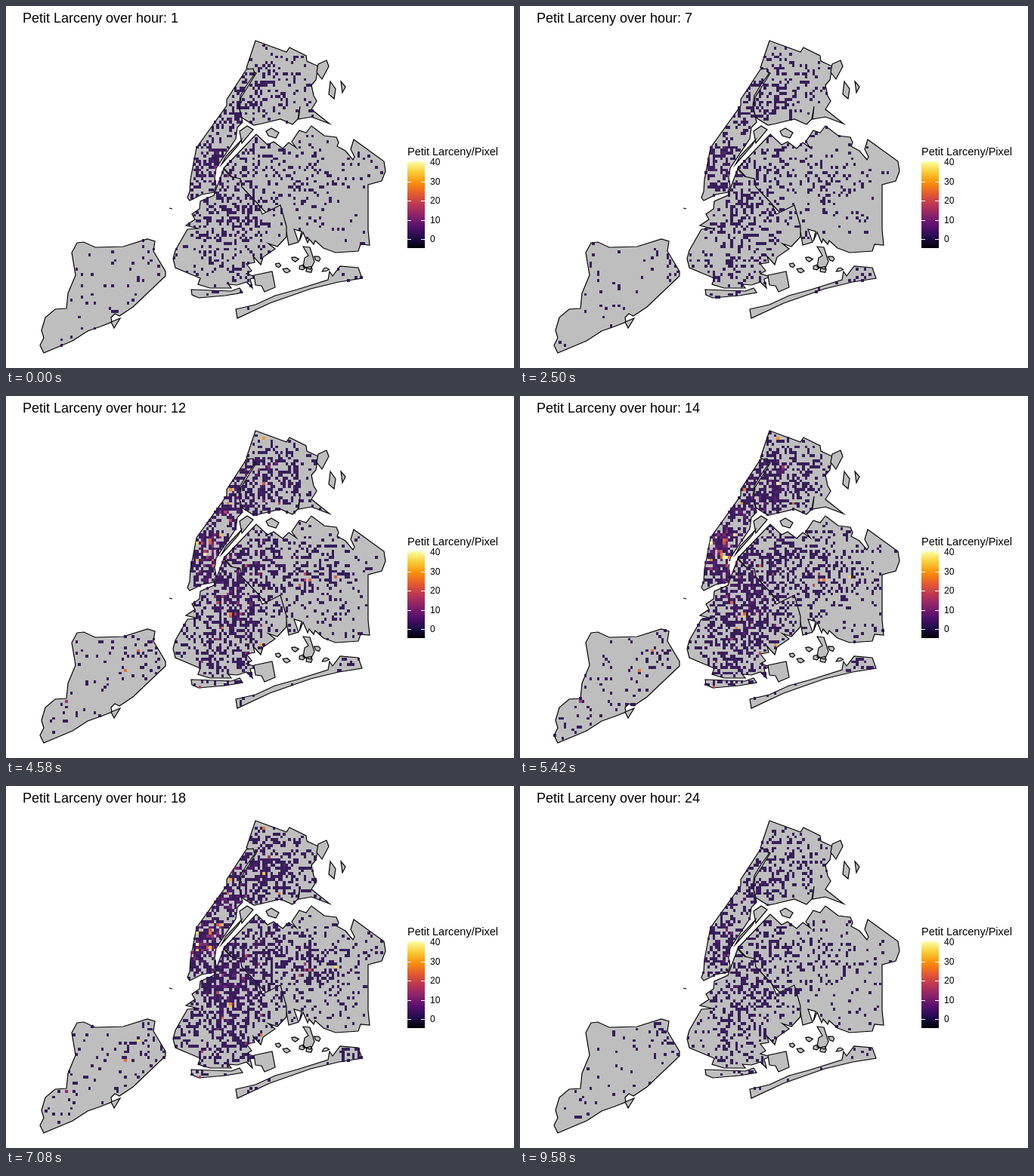
These frames come from a looping animation (672x480 px, 10 s). An HTML page with a canvas:

```html
<!DOCTYPE html>
<html lang="en">
<head>
<meta charset="utf-8">
<style>
  html, body { margin: 0; width: 100%; height: 100%; overflow: hidden; background: #fff; }
  canvas { display: block; }
</style>
</head>
<body>
<canvas id="map" width="672" height="480"></canvas>
<script>
const ctx = document.getElementById('map').getContext('2d');
const LOOP = 10000, HOURS = 24;
const CELL_W = 3.39, CELL_H = 3.75, LEFT = 44.4, TOP = 43;

// Coastlines; the fourth region overlaps the third to form their shared border
const coasts = {
  north: 'M330 46 371 61 375 55 397 66 398 73 413 80 410 98 404 105 407 119 411 126 404 137 428 156 404 147 387 150 389 133 386 150 379 157 363 150 338 156 328 158 312 148 309 137 311 121 321 105 331 89 318 82Z',
  midtown: 'M327 83 318 84 292 124 292 132 252 188 244 230 243 246 240 254 243 258 259 250 275 247 278 238 276 228 278 215 304 176 306 161 313 154 308 133 310 119 319 104 329 90Z',
  east: 'M288 215 331 170 346 184 354 180 366 189 374 181 384 188 378 180 388 165 397 168 404 159 421 172 437 174 440 181 438 186 449 192 459 204 461 200 456 190 460 177 500 206 502 219 497 232 479 237 479 297 481 317 469 316 466 325 436 327 420 321 409 311 407 316 401 309 399 314 393 300 388 312 391 299 381 296 387 313 374 317 371 300 340 270Z',
  south: 'M288 216 279 240 275 251 257 259 256 269 246 276 250 283 238 291 254 295 240 296 224 324 221 335 224 347 257 361 254 369 270 374 298 374 294 369 306 370 318 366 326 374 323 362 331 359 318 355 325 351 318 342 329 340 327 332 337 343 340 333 356 322 347 315 359 319 371 306 371 292 363 264 339 276 333 262 312 240 310 229 297 226Z',
  beach: 'M245 376 298 378 309 374 313 380 290 384 255 387 246 383Z',
  spit: 'M304 402 330 396 356 384 385 376 426 363 428 352 432 358 442 345 466 347 471 361 440 366 403 375 349 394 306 414Z',
  southwest: 'M94 314 103 313 118 320 155 319 187 309 197 312 195 325 211 352 211 358 168 399 150 411 144 408 139 413 140 419 125 425 108 431 88 444 50 460 45 450 50 440 47 430 52 413 65 402 80 401 82 381 92 357 87 327Z'
};
const regions = Object.values(coasts).map(d => new Path2D(d));

const islets = new Path2D(`M413 77 424 72 427 80 418 97 411 88Z M429 100 436 110 434 123 427 117Z M443 100 449 107 445 115Z
  M309 166 319 159 327 164 312 182Z M311 178 307 185 285 210 291 199Z M344 166 351 162 361 168 357 175 347 172Z
  M216 268 220 269Z M328 357 352 352 356 373 342 379 338 371 330 370Z
  M393 319 402 320 408 339 403 349 393 346 395 334 400 331Z M139 419 143 427 151 414Z`);

// Activity centres: x, y, radius, weight
const centres = [
  [325, 118, 40, 1], [375, 100, 35, .3], [266, 207, 32, 1.6], [292, 158, 25, .9],
  [345, 208, 32, .6], [300, 270, 45, 1.05], [285, 345, 45, .5], [410, 235, 40, .45],
  [455, 355, 15, .5], [190, 335, 25, .2], [287, 171, 9, -1.4]
];

const inferno = ['000004', '210c4a', '57106e', '8a226a', 'bc3754', 'e45a31', 'f98e09', 'f9cb35', 'fcffa4'];
const palette = inferno.map(hex => [0, 2, 4].map(i => parseInt(hex.slice(i, i + 2), 16)));

function color(count) {
  const pos = Math.min((count + 4.5) / 45, .999) * (palette.length - 1), i = Math.floor(pos);
  return `rgb(${palette[i].map((c, k) => Math.round(c + (palette[i + 1][k] - c) * (pos - i)))})`;
}

function rand(i, j, k) {
  const s = Math.sin(i * 12.9898 + j * 78.233 + k * 37.719) * 43758.5453;
  return s - Math.floor(s);
}

// Marsh islands in the bay: small irregular polygons around a loose row
for (let n = 0; n < 7; n++) {
  const x = 360 + n * 10.5, y = 344 + 9 * Math.sin(n * 2.2);
  for (let k = 0; k < 5; k++) {
    const a = k * Math.PI * .4, r = 2.5 + 4 * rand(n, k, 3);
    islets[k ? 'lineTo' : 'moveTo'](x + r * Math.cos(a), y + r * .8 * Math.sin(a));
  }
  islets.closePath();
}

const cells = [];
for (let i = 0; i < 136; i++) {
  for (let j = 0; j < 110; j++) {
    const x = LEFT + (i + .5) * CELL_W, y = TOP + (j + .5) * CELL_H;
    if (!regions.some(r => ctx.isPointInPath(r, x, y))) continue;
    const density = centres.reduce((sum, [cx, cy, r, w]) =>
      sum + w * Math.exp(-((x - cx) ** 2 + (y - cy) ** 2) / r ** 2), .065);
    const rate = Math.max(density, .02) * (.3 + 1.4 * rand(i, j, 0));
    cells.push({ i, j, rate, shops: rand(i, j, 90) < .02 * density });
  }
}

function countAt({ i, j, rate, shops }, hour) {
  const activity = .75 + .4 * Math.cos((hour - 16) / HOURS * 2 * Math.PI);
  const trade = Math.sqrt(Math.max(0, Math.sin(Math.PI * (hour - 7) / 16)));
  const u = rand(i, j, hour), v = rand(i, j, hour + 50);
  if (shops && trade) return (14 + 22 * rand(i, j, 91)) * trade * (.7 + .5 * v);
  if (u > 1 - Math.exp(-rate * activity)) return 0;
  return 2 + Math.floor(-Math.log(v + 1e-6) * rate * rate * (.4 + .9 * trade));
}

function text(str, x, y, size) {
  ctx.fillStyle = '#000';
  ctx.font = `${size}px "Liberation Sans", Arial, sans-serif`;
  ctx.fillText(str, x, y);
}

function drawLegend() {
  text('Petit Larceny/Pixel', 531, 198, 14.5);
  const bar = ctx.createLinearGradient(0, 321, 0, 206);
  inferno.forEach((hex, i) => bar.addColorStop(i / (inferno.length - 1), '#' + hex));
  ctx.fillStyle = bar;
  ctx.fillRect(531, 206, 23, 115);
  for (let n = 0; n <= 40; n += 10) {
    const y = Math.round(309 - n * 2.55);
    ctx.fillStyle = '#fff';
    ctx.fillRect(531, y, 5, 1);
    ctx.fillRect(549, y, 5, 1);
    text(n, 561, y + 4, 12);
  }
}

function draw(hour) {
  ctx.fillStyle = '#fff';
  ctx.fillRect(0, 0, 672, 480);
  text('Petit Larceny over hour: ' + hour, 22, 22, 18);
  ctx.lineWidth = 1.2;
  for (const shape of [...regions, islets]) {
    ctx.fillStyle = '#bebebe';
    ctx.fill(shape);
    ctx.stroke(shape);
  }
  ctx.globalAlpha = .9;
  for (const cell of cells) {
    const count = countAt(cell, hour);
    if (!count) continue;
    const x = Math.round(LEFT + cell.i * CELL_W), y = Math.round(TOP + cell.j * CELL_H);
    ctx.fillStyle = color(count);
    ctx.fillRect(x, y, Math.round(LEFT + (cell.i + 1) * CELL_W) - x, Math.round(TOP + (cell.j + 1) * CELL_H) - y);
  }
  ctx.globalAlpha = 1;
  drawLegend();
}

let shown = 0;
function frame() {
  // Steps fall on times rounded to 10 ms
  const hour = Math.floor((performance.now() + 5) % LOOP * HOURS / LOOP) + 1;
  if (hour !== shown) draw(shown = hour);
  requestAnimationFrame(frame);
}
frame();
</script>
</body>
</html>
```
